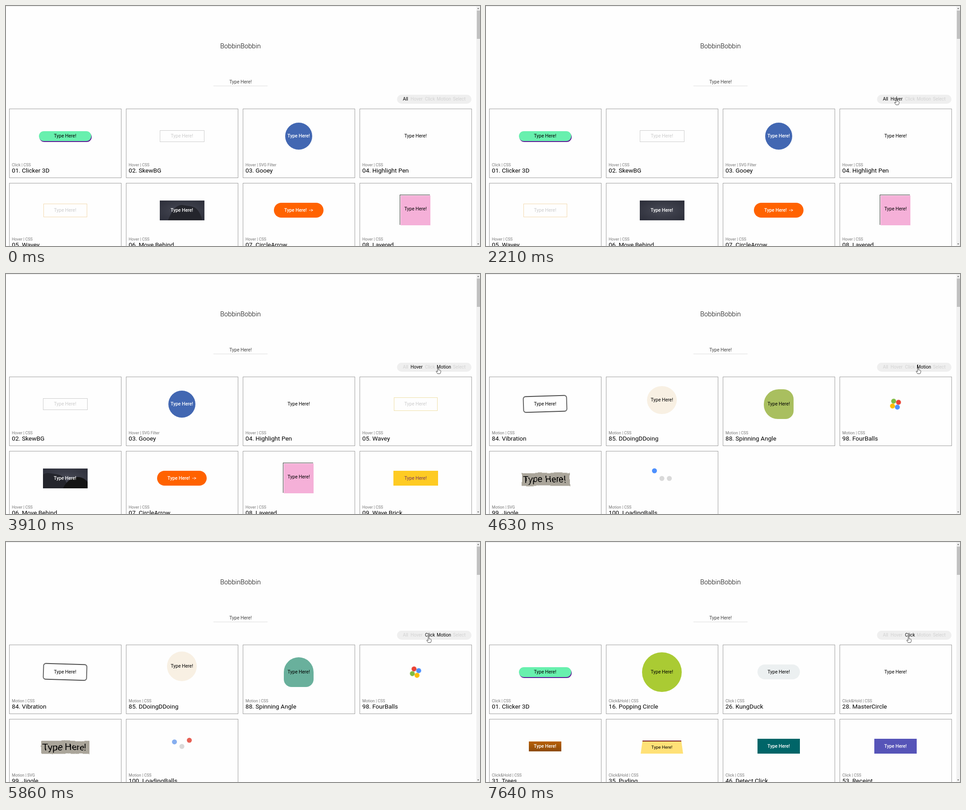
An HTML page for the animation above (8000 ms loop, 1051 px wide and 533 px high).

```html
<!DOCTYPE html>
<html lang="en">
<head>
<meta charset="utf-8">
<title>Button gallery</title>
<style>
* { box-sizing: border-box; }
html, body { margin: 0; width: 100%; height: 100%; overflow: hidden; }
body { position: relative; background: #fefefe; color: #000; font: 10.5px Roboto, sans-serif; font-variant-ligatures: none; }
body > *, .card, .card > *, .pill span, .grid { position: absolute; }
svg { overflow: visible; }

.top { left: 0; top: 0; width: 100%; height: 1px; background: #e4e4e4; }
h1 { left: 420px; width: 200px; top: 78px; margin: 0; text-align: center; font: 300 14.7px/22px Roboto, sans-serif; }
.input { left: 460px; top: 160px; width: 120px; height: 18px; border-bottom: 1px solid #ddd; color: #444; text-align: center; line-height: 18px; }

.bar { left: 1043px; top: 1px; width: 8px; height: 532px; background: #f1f1f1; }
.bar path { fill: #555; }

.pill { left: 867px; top: 197px; width: 165px; height: 20px; border-radius: 10px; background: #efefef; font-size: 10.2px; line-height: 20px; color: #d2d2d2; }
.pill span { animation: 8s step-end infinite; }
.pill span:nth-child(1) { left: 13px; animation-name: all; }
.pill span:nth-child(2) { left: 30px; animation-name: hov; }
.pill span:nth-child(3) { left: 62px; animation-name: clk; }
.pill span:nth-child(4) { left: 88px; animation-name: mot; }
.pill span:nth-child(5) { left: 124px; }
@keyframes all { 0% { color: #000; } 28.625%, to { color: #d2d2d2; } }
@keyframes hov { 18.1% { color: #000; } 53.75%, to { color: #d2d2d2; } }
@keyframes clk { 39.75% { color: #000; } 42.9% { color: #d2d2d2; } 69.4%, to { color: #000; } }
@keyframes mot { 42.9% { color: #000; } 77.5%, to { color: #d2d2d2; } }

.grid { left: 0; top: 0; visibility: hidden; animation: 8s step-end infinite; }
#all { animation-name: showAll; }
#hover { animation-name: showHover; }
#motion { animation-name: showMotion; }
#click { animation-name: showClick; }
@keyframes showAll { 0% { visibility: visible; } 28.625%, to { visibility: hidden; } }
@keyframes showHover { 0% { visibility: hidden; } 28.625% { visibility: visible; } 53.75%, to { visibility: hidden; } }
@keyframes showMotion { 0% { visibility: hidden; } 53.75% { visibility: visible; } 77.5%, to { visibility: hidden; } }
@keyframes showClick { 0% { visibility: hidden; } 77.5%, to { visibility: visible; } }

.card { width: 249px; height: 154px; border: 1px solid #9c9c9c; }
.meta { left: 5px; top: 118px; font-size: 8.85px; line-height: 12px; color: #777; white-space: nowrap; }
.name { left: 5px; top: 128px; font-size: 13.6px; line-height: 16px; white-space: nowrap; }
.b { --w: 60px; --h: 20px; width: var(--w); height: var(--h); left: calc(123px - var(--w) / 2); top: calc(59.5px - var(--h) / 2);
  display: flex; align-items: center; justify-content: center; white-space: nowrap; }
.b > * { position: relative; }
.b > svg, .b > i { position: absolute; }
.b3, .b6, .b7, .b31, .b46, .b53 { color: #fff; font-size: 10.4px; font-weight: 500; }

.b1 { --w: 116px; --h: 22px; border-radius: 11px; background: #68f0ae; box-shadow: 1px 2px #5c1696; }
.b2 { --w: 99px; --h: 26px; border: 1px solid #ccc; color: #ccc; }
.b3 { --w: 60px; --h: 60px; border-radius: 50%; background: #4267b2; }
.b5 { --w: 97px; --h: 30px; border: 1px solid #f3d9ae; color: #ccc; }
#hover .b5 { border-color: #efdfa6; }
.b6 { --w: 99px; --h: 44px; overflow: hidden; background: radial-gradient(#484a56, #2c2e39); }
.b6 svg { left: 0; top: 0; }
.b7 { --w: 110px; --h: 33px; border-radius: 17px; background: #ff6200; }
.b8 { --w: 66px; --h: 66px; background: #f5b0d8; padding-bottom: 6px; }
.b8::before { content: ""; position: absolute; left: -2px; top: -2px; width: 66px; height: 66px; border: solid #333; border-width: 1px 0 0 1px; }
.b9 { --w: 99px; --h: 33px; background: #fecb23; color: #7a3560; }
.b16 { --w: 88px; --h: 88px; border-radius: 50%; background: #aacb33; }
.b26 { --w: 94px; --h: 33px; border-radius: 17px; background: #ecf0f1; }
.b31 { --w: 72px; --h: 22px; background: linear-gradient(#b76004, #8c4a0c); }
.b35 { --w: 94px; --h: 29px; margin-top: 2px; font-size: 9.9px; }
.b35 svg { left: 0; top: -.5px; }
.b46 { --w: 94px; --h: 33px; background: #006568; }
.b53 { --w: 94px; --h: 33px; background: #5654b8; }

.hill { animation: 8s linear infinite; }
.back { fill: #24252c; animation-name: back; }
.front { fill: #141414; animation-name: front; }
#hover .back { animation-delay: -3417ms; }
#hover .front { animation-delay: -5490ms; }
@keyframes back {
  0% { transform: translate(18px, 0); }
  11.4% { transform: translate(65px, 12px); }
  16.25%, 78.7% { transform: translate(100px, 36px); }
  78.75% { transform: translate(-78px, 0); }
  to { transform: translate(18px, 0); }
}
@keyframes front {
  0%, 1.4% { transform: translate(-72px, 0); }
  11.4% { transform: translate(7px, 0); }
  17.5% { transform: translate(41px, 8px); }
  20.5% { transform: translate(57px, 18px); }
  23.5%, to { transform: translate(74px, 36px); }
}

.b84 { --w: 96px; --h: 35px; }
.b84 rect { fill: none; stroke: #111; stroke-width: 1.3; transform-origin: 48px 17.5px; animation: shake 222.222ms ease-in-out -36.7ms infinite; }
@keyframes shake { 0%, to { transform: rotate(-1.8deg); } 50% { transform: rotate(1.8deg); } }
.b85 { --w: 66px; --h: 66px; }
.b85 i { inset: 0; border-radius: 50%; background: #f8f0e3; }
.b88 { --w: 66px; --h: 66px; animation: corners 4s linear -3370ms infinite; }
@keyframes corners {
  0%, to { border-radius: 33px 22px 18px 31px; background: #a9bf5f; }
  30.75% { border-radius: 33px 33px 17px 17px; background: #69b09c; }
  50% { border-radius: 17px 33px 33px 17px; background: #6c8fc4; }
  75% { border-radius: 17px 17px 33px 33px; background: #c9a25e; }
}
.b98 { --w: 0px; --h: 0px; }
.b84 svg, .b98 svg, .b99 svg, .b100 svg { left: 0; top: 0; }
.b98 g { animation: turn 1.6s linear -28ms infinite; }
@keyframes turn { to { transform: rotate(360deg); } }
.b99 { --w: 108px; --h: 30px; margin-left: 2px; margin-top: 2px; }
.b100 { --w: 0px; --h: 0px; }

.caret { left: 0; top: 201px; width: 1px; height: 12px; background: #000; animation: caret 8s step-end infinite; }
@keyframes caret {
  0% { opacity: 0; transform: translateX(910px); }
  25.875% { opacity: 1; transform: translateX(910px); }
  32.75% { opacity: 0; transform: translateX(910px); }
  39% { opacity: 1; transform: translateX(910px); }
  45.25% { opacity: 0; transform: translateX(910px); }
  51.5% { opacity: 1; transform: translateX(910px); }
  53.125% { opacity: 1; transform: translateX(957px); }
  59.5% { opacity: 0; transform: translateX(957px); }
  65.875% { opacity: 1; transform: translateX(957px); }
  72.25% { opacity: 0; transform: translateX(957px); }
  76.25% { opacity: 1; transform: translateX(935px); }
  82.625% { opacity: 0; transform: translateX(935px); }
  89% { opacity: 1; transform: translateX(935px); }
  95.5%, to { opacity: 0; transform: translateX(935px); }
}
.cursor { left: 0; top: 0; animation: move 8s linear infinite; }
.cursor path { fill: #fff; stroke: #222; stroke-width: .8; stroke-linejoin: round; }
.arrow { animation: arrow 8s step-end infinite; }
.hand { animation: hand 8s step-end infinite; }
@keyframes arrow { 0% { opacity: 1; } 18.1%, to { opacity: 0; } }
@keyframes hand { 0% { opacity: 0; } 18.1%, to { opacity: 1; } }
@keyframes move {
  0%, 7.5% { transform: translate(738px, -16px); }
  10.125% { transform: translate(752px, 100px); }
  11.375% { transform: translate(793px, 127px); }
  18.1% { transform: translate(905px, 203px); }
  20.6%, 37.5% { transform: translate(910px, 206px); }
  41.9% { transform: translate(945px, 208px); }
  44.4%, 67.5% { transform: translate(958px, 208px); }
  70.6%, to { transform: translate(937px, 210px); }
}
</style>
</head>
<body>
<div class="top"></div>
<h1>BobbinBobbin</h1>
<div class="input">Type Here!</div>
<div class="pill"><span>All</span><span>Hover</span><span>Click</span><span>Motion</span><span>Select</span></div>
<div class="grid" id="all"></div>
<div class="grid" id="hover"></div>
<div class="grid" id="motion"></div>
<div class="grid" id="click"></div>
<svg class="bar" viewBox="0 0 8 532" width="8" height="532">
  <rect x="1" y="9" width="7" height="63" fill="#c1c1c1"/>
  <path d="M2 5.5L4 3L6 5.5ZM2 526.5L4 529L6 526.5Z"/>
</svg>
<div class="caret"></div>
<svg class="cursor" width="1" height="1">
  <path class="arrow" d="M0 0V9.5L2.2 7.5L3.6 10.8L5 10.2L3.6 7H6.4Z"/>
  <path class="hand" d="M-1 .8a1 1 0 0 1 2 0V5L4.5 5.6Q6 6 6 7.5V10L4.5 13.5H-1L-4 9Q-4.6 7.6 -3 7.6L-1 9Z"/>
</svg>

<script>
const label = '<span>Type Here!</span>';
const ball = (x, y, color) => `<circle cx="${x}" cy="${y}" r="5.5" fill="${color}"/>`;
const svg = (w, h, inner) => `<svg width="${w}" height="${h}">${inner}</svg>`;

// number: [kind, name, button content]
const cards = {
  1: ['Click | CSS', 'Clicker 3D'],
  2: ['Hover | CSS', 'SkewBG'],
  3: ['Hover | SVG Filter', 'Gooey'],
  4: ['Hover | CSS', 'Highlight Pen'],
  5: ['Hover | CSS', 'Wavey'],
  6: ['Hover | CSS', 'Move Behind', svg(99, 44,
    '<path class="hill back" d="M0 44C10 20 18 10 32 10L52 13C66 16 72 28 76 44V90H0Z"/>' +
    '<path class="hill front" d="M0 44C8 20 24 11 36 11S60 18 71 44V90H0Z"/>') + label],
  7: ['Hover | CSS', 'CircleArrow', '<span>Type Here! &nbsp;-&gt;</span>'],
  8: ['Hover | CSS', 'Layered'],
  9: ['Hover | CSS', 'Wave Brick'],
  16: ['Click&amp;Hold | CSS', 'Popping Circle'],
  26: ['Click | CSS', 'KungDuck'],
  28: ['Click&amp;Hold | CSS', 'MasterCircle'],
  31: ['Click&amp;Hold | CSS', 'Trees'],
  35: ['Click&amp;Hold | CSS', 'Puding', svg(94, 29,
    '<path d="M4 0H90L94 29H0Z" fill="#ffe177"/><path d="M4 0H90V2H4Z" fill="#7a1a20"/>') + label],
  46: ['Click | CSS', 'Detect Click'],
  53: ['Click | CSS', 'Receipt'],
  84: ['Motion | CSS', 'Vibration', svg(96, 35, '<rect width="96" height="35" rx="5"/>') + label],
  85: ['Motion | CSS', 'DDoingDDoing', '<i></i>' + label],
  88: ['Motion | CSS', 'Spinning Angle'],
  98: ['Motion | CSS', 'FourBalls', svg(1, 1, '<g>' + ball(7.8, 0, '#ea4335') + ball(0, 7.8, '#4d90fe') +
    ball(-7.8, 0, '#fbbc05') + ball(0, -7.8, '#7fbb42') + '</g>')],
  99: ['Motion | SVG', 'Jiggle', svg(108, 30,
    '<filter id="jig" x="-10%" y="-30%" width="120%" height="160%" color-interpolation-filters="sRGB">' +
    '<feTurbulence type="fractalNoise" baseFrequency=".03" numOctaves="3"/>' +
    '<feDisplacementMap in="SourceGraphic" scale="6" xChannelSelector="R" yChannelSelector="G"/></filter>' +
    '<g filter="url(#jig)"><rect width="107" height="29" y=".5" fill="#aaa59a"/>' +
    '<text x="3" y="21.5" font-size="20.3">Type Here!</text></g>')],
  100: ['Motion | CSS', 'LoadingBalls', svg(1, 1, [-16.5, 0, 16.5].map(x => ball(x, 0, '#d9d9d9')).join(''))]
};
const grids = {
  all: [1, 2, 3, 4, 5, 6, 7, 8],
  hover: [2, 3, 4, 5, 6, 7, 8, 9],
  motion: [84, 85, 88, 98, 99, 100],
  click: [1, 16, 26, 28, 31, 35, 46, 53]
};
for (const id in grids) {
  document.getElementById(id).innerHTML = grids[id].map((n, i) => {
    const [kind, name, body = label] = cards[n];
    return `<div class="card" style="left:${7 + 259 * (i % 4)}px;top:${228 + 165 * (i >> 2)}px">` +
      `<div class="b b${n}">${body}</div><div class="meta">${kind}</div>` +
      `<div class="name">${String(n).padStart(2, '0')}. ${name}</div></div>`;
  }).join('');
}

const find = s => document.querySelector(s);
const bouncer = find('.b85'), blob = find('.b85 i'), noise = find('feTurbulence');
const dots = [...document.querySelectorAll('.b100 circle')];
const tints = [[77, 144, 254], [251, 188, 5], [234, 67, 53]];
const mod = (a, n) => ((a % n) + n) % n;

function draw(t) {
  // bounce: squashed while low
  const up = 14 * Math.abs(Math.sin(Math.PI * (t - 4630) / 512 + 0.7));
  bouncer.style.transform = `translateY(${-up}px)`;
  blob.style.transform = `scaleY(${Math.min(1, 0.82 + up * 0.0135)})`;

  // three hops, each starting when the previous one peaks
  const hop = 1024;
  dots.forEach((dot, i) => {
    const p = mod(t - 4630 + hop / 2 - i * hop / 2, hop * 1.5) / hop;
    const h = p < 1 ? Math.sin(Math.PI * p) : 0;
    dot.setAttribute('cy', -17 * h);
    dot.setAttribute('fill', `rgb(${tints[i].map(c => Math.round(217 + (c - 217) * h))})`);
  });

  noise.setAttribute('seed', 1 + Math.floor(t / 100) % 5);
}

let start;
function tick(now) {
  start ??= now;
  draw((now - start) % 8000);
  requestAnimationFrame(tick);
}
draw(0);
requestAnimationFrame(tick);
</script>
</body>
</html>
```
